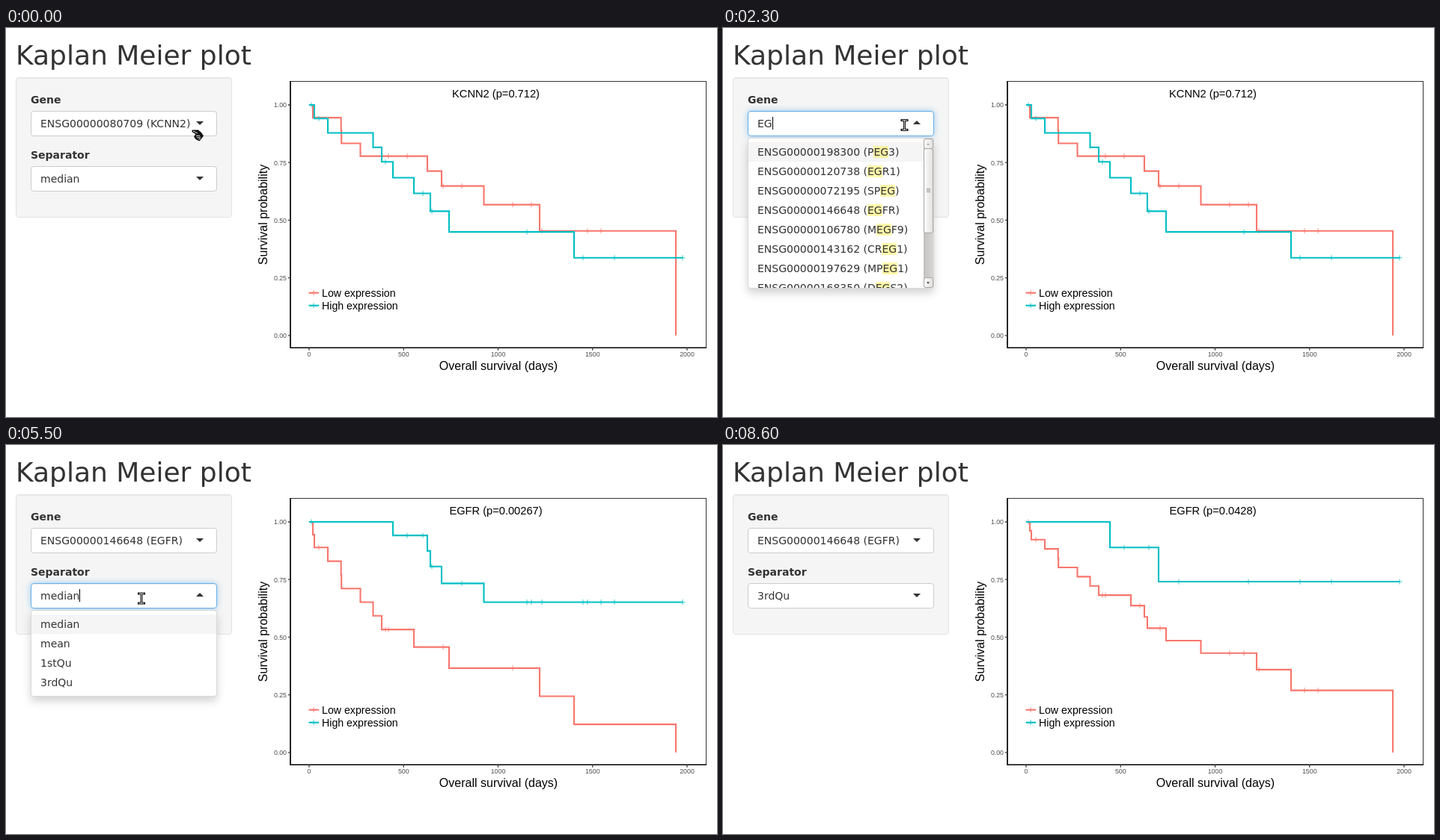
Write an HTML page that moves like this. It is 950 px wide and 521 px high and loops after 8700 ms.

```html
<!DOCTYPE html>
<html lang="en">
<head>
<meta charset="utf-8">
<title>Survival plot</title>
<style>
  html, body { margin: 0; width: 100%; height: 100%; overflow: hidden; background: #fff; }
  body { position: relative; font: 14px/20px "DejaVu Sans", sans-serif; color: #333; }
  body > *, .box::after, .bar, .bar * { position: absolute; box-sizing: border-box; }
  h2 { left: 13px; top: 17px; margin: 0; font-weight: 400; font-size: 36px; line-height: 40px; white-space: nowrap; }
  .well { left: 13px; top: 66px; width: 289px; height: 188px; background: #f5f5f5;
    border: 1px solid #e3e3e3; border-radius: 4px; box-shadow: inset 0 1px 1px rgba(0,0,0,.05); }
  b { left: 33px; }
  .box { left: 33px; width: 249px; height: 34px; padding: 6px 12px; display: flex; align-items: center;
    white-space: pre; background: #fff; border: 1px solid #ccc; border-radius: 4px; }
  .box::after { content: ""; right: 17px; top: 13px; border: 5px solid transparent;
    border-top-color: #333; border-bottom-width: 0; }
  .box.focus { border-color: #66afe9;
    box-shadow: inset 0 1px 1px rgba(0,0,0,.075), 0 0 8px rgba(102,175,233,.6); }
  .box.open::after { top: 12px; border-width: 0 5px 5px; border-bottom-color: #333; }
  .box i { width: 1px; height: 17px; margin-top: -1px; background: #000; }
  .menu { left: 33px; width: 249px; background: #fff; border: 1px solid rgba(0,0,0,.15);
    border-radius: 4px; box-shadow: 0 6px 12px rgba(0,0,0,.175); }
  .list { max-height: 200px; padding: 5px 0; box-sizing: border-box; overflow: hidden; }
  .list.long { margin-right: 13px; }
  .list div { padding: 3px 12px; }
  .list .on { background: #f5f5f5; }
  mark { background: rgba(255,237,40,.4); color: inherit; border-radius: 1px; }
  .bar { right: 0; top: 0; width: 13px; height: 200px; border-radius: 4px;
    background: linear-gradient(90deg, #c4c2c0, #d8d6d4); }
  .bar * { left: 0; width: 13px; border: 1px solid #a9a6a3; border-radius: 3px;
    background: linear-gradient(90deg, #fbfbfb, #e4e2e0); }
  .bar u { height: 14px; }
  .bar u::after { content: ""; position: absolute; left: 3px; top: 5px; border: 2.5px solid transparent; }
  .bar .up::after { border-top-width: 0; border-bottom: 3px solid #b5b5b5; }
  .bar .down { bottom: 0; }
  .bar .down::after { border-bottom-width: 0; border-top: 3px solid #555; }
  .bar s { top: 13px; }
  .bar s::after { content: ""; position: absolute; left: 3px; top: 50%; margin-top: -3px; width: 5px; height: 5px;
    background: repeating-linear-gradient(#999 0 1px, transparent 1px 2px); }
  svg { left: 0; top: 0; width: 950px; height: 521px; }
  svg text { font-family: "Liberation Sans", Arial, sans-serif; fill: #000; }
  .tick text { font-size: 8.8px; fill: #4d4d4d; }
</style>
</head>
<body>
<h2>Kaplan Meier plot</h2>
<div class="well"></div>
<b style="top:86px">Gene</b>
<b style="top:160px">Separator</b>
<div class="box" id="gene" style="top:111px"></div>
<div class="box" id="sep" style="top:185px"></div>

<svg viewBox="0 0 950 521">
  <rect x="380" y="71.5" width="555.5" height="357" fill="none" stroke="#333"/>
  <path d="M380 71V428.3H936" fill="none" stroke="#000" stroke-width="1.5"/>
  <g class="tick" id="ticks"></g>
  <text id="head" x="654.5" y="93" font-size="14.67" text-anchor="middle"></text>
  <text x="658" y="458" font-size="16" text-anchor="middle">Overall survival (days)</text>
  <text transform="translate(349 250) rotate(-90)" font-size="16" text-anchor="middle">Survival probability</text>
  <text x="422" y="360" font-size="14.2">Low expression</text>
  <text x="422" y="377" font-size="14.2">High expression</text>
  <g id="curves" fill="none"></g>
</svg>

<div class="menu" id="geneMenu" style="top:147px"></div>
<div class="menu" id="sepMenu" style="top:221px"></div>

<svg viewBox="0 0 950 521">
  <path id="arrow" d="M.5 .5V16.5L4.3 13 7 19.3 9.8 18.1 7.1 12H12Z" fill="#fff" stroke="#111" stroke-width="1.2"/>
  <g id="hand">
    <path d="M1 1H9L13 4.5 15.5 8.5 10.5 15 6 13 3.5 9.5 6 6 1 3Z" fill="#111" stroke="#111"/>
    <path d="M2 2 8 5M6 8.5 11 8M7 11 12 10M9 13 12 12" stroke="#fff" stroke-width=".9" fill="none"/>
  </g>
  <g id="beam" fill="none" stroke-linecap="square">
    <path d="M-3.500-6.500H3.500M-3.500 6.500H3.500M0-6V6" stroke="#111" stroke-width="3"/>
    <path d="M-3-6.500H3M-3 6.500H3M0-6V6" stroke="#fff" stroke-width=".8"/>
  </g>
</svg>

<script>
const LOOP = 8700, STEP = 100;
const $ = id => document.getElementById(id);
const RED = '#F8766D', TEAL = '#00BFC4';
const X0 = 405, Y1 = 103, SPAN = 308.8;

// Patients by expression: KCNN2 is 0 or 1 (above median), EGFR 0, 1 (above median) or 2 (above 3rd quartile)
const cohort = (kcnn2, egfr, deaths, censored) => [
  ...deaths.map(x => ({ x, kcnn2, egfr, dead: true })),
  ...censored.map(x => ({ x, kcnn2, egfr, dead: false }))
];
const patients = [
  cohort(0, 0, [410, 447.7, 448.2, 473.5, 713, 895], [511, 584, 677]),
  cohort(0, 1, [563, 638.5], [716, 777, 795]),
  cohort(0, 2, [582], [536, 609, 702]),
  cohort(1, 0, [412, 430, 490.5, 502, 545, 592, 759], [418, 507]),
  cohort(1, 1, [567], [408, 557, 696]),
  cohort(1, 2, [517], [569, 771, 813, 904])
].flat().sort((a, b) => a.x - b.x);

const cross = (x, y) => `M${x} ${y - 3.5}v7M${x - 3.5} ${y}h7`;
const stroke = (d, color, width, alpha = 1) =>
  `<path d="${d}" stroke="${color}" stroke-width="${width}" opacity="${alpha}"/>`;
const steps = (line, marks, color) => stroke(line, color, 2.1) + stroke(marks, color, 1, .8);
const legend = (y, color) => steps(`M404.5 ${y}h13.5`, cross(411, y), color);

// Kaplan-Meier estimate drawn as steps with censor marks
function curve(group, color) {
  let risk = group.length, s = 1, y = Y1, line = `M${X0} ${y}`, marks = '';
  for (const p of group) {
    line += `H${p.x}`;
    if (p.dead) {
      s *= (risk - 1) / risk;
      y = Y1 + (1 - s) * SPAN;
      line += `V${y}`;
    } else marks += cross(p.x, y);
    risk--;
  }
  return steps(line, marks, color);
}

function drawPlot(head, isHigh) {
  $('head').textContent = head;
  $('curves').innerHTML = curve(patients.filter(p => !isHigh(p)), RED) +
    curve(patients.filter(isHigh), TEAL) + legend(354.7, RED) + legend(371.7, TEAL);
}

for (let i = 0; i < 5; i++) {
  const x = X0 + i * 126.25, y = Y1 + SPAN * (1 - i / 4);
  $('ticks').innerHTML += `<path d="M${x} 428v3.7M377 ${y}h3" stroke="#333" stroke-width="1.3"/>
    <text x="${x}" y="440" text-anchor="middle">${i * 500}</text>
    <text x="375" y="${y + 3.3}" text-anchor="end">${(i / 4).toFixed(2)}</text>`;
}

const KCNN2 = 'ENSG00000080709 (KCNN2)', EGFR = 'ENSG00000146648 (EGFR)', MEGF9 = 'ENSG00000106780 (MEGF9)';
const first = [KCNN2, 'ENSG00000105607 (GCDH)', 'ENSG00000059769 (DNAJC25)', 'ENSG00000155666 (KDM8)',
  'ENSG00000143257 (NR1I3)', 'ENSG00000091831 (ESR1)', 'ENSG00000115841 (RMDN2)'];
const matches = ['ENSG00000198300 (PEG3)', 'ENSG00000120738 (EGR1)', 'ENSG00000072195 (SPEG)', EGFR, MEGF9,
  'ENSG00000143162 (CREG1)', 'ENSG00000197629 (MPEG1)', 'ENSG00000168350 (DEGS2)'];
const splits = ['median', 'mean', '1stQu', '3rdQu'];
const search = q => q.length < 2 ? first : matches.filter(name => name.includes(q));

// Times of key presses and of the list catching up
const presses = [1900, 2200, 2600, 2800], refreshes = [2100, 2300, 2600, 2900];
const typed = (times, t) => 'EGFR'.slice(0, times.filter(k => k <= t).length);
const blink = (since, t) => t >= since && Math.floor((t - since) / 500) % 2 === 0;

// Pointer moves: from time, to time, x, y
const moves = [[0, 200, 242.5, 130], [3400, 3600, 238, 155], [3800, 4000, 230, 163],
  [4800, 5300, 196, 192], [5400, 6300, 61, 313.5], [7100, 7200, 19, 326]];

function pointerAt(t) {
  let x = 248, y = 136;
  for (const [from, to, tx, ty] of moves) {
    const f = Math.min(1, Math.max(0, (t - from) / (to - from)));
    x += (tx - x) * f;
    y += (ty - y) * f;
  }
  return [x, y];
}

function pointerKind(y, geneOpen, sepOpen) {
  const onGene = y > 111 && y < 145, onSep = y > 185 && y < 219;
  if (geneOpen && onGene || sepOpen && onSep) return 'beam';
  return geneOpen || sepOpen || onGene || onSep ? 'hand' : 'arrow';
}

function setBox(id, text, caret, focus, open) {
  $(id).className = 'box' + (focus ? ' focus' : '') + (open ? ' open' : '');
  $(id).innerHTML = `<span>${text}</span>${caret ? '<i></i>' : ''}`;
}

function setMenu(id, open, rows, active, q = '', thumb = 0) {
  $(id).style.display = open ? 'block' : 'none';
  if (!open) return;
  const paint = s => q ? s.split(q).join(`<mark>${q}</mark>`) : s;
  const items = rows.map((r, i) => `<div class="${i === active ? 'on' : ''}">${paint(r)}</div>`).join('');
  const bar = `<div class="bar"><u class="up"></u><s style="height:${thumb}px"></s><u class="down"></u></div>`;
  $(id).innerHTML = `<div class="list ${thumb ? 'long' : ''}">${items}</div>${thumb ? bar : ''}`;
}

function render(t) {
  const [x, y] = pointerAt(t);
  const geneOpen = t >= 400 && t < 3800, sepOpen = t >= 5200 && t < 6600;

  const q = typed(refreshes, t), rows = search(q);
  const text = t < 1000 ? KCNN2 : t < 3800 ? typed(presses, t) : EGFR;
  const lastEdit = [500, 1100, presses[0], ...refreshes].filter(k => k <= t).pop();
  setBox('gene', text, geneOpen && blink(lastEdit, t), t >= 400 && t < 5200, geneOpen);
  setMenu('geneMenu', geneOpen, rows, 0, q, rows.length < 3 ? 0 : rows === first ? 34 : 114);

  const hover = Math.max(0, Math.min(3, Math.floor((y - 227) / 26)));
  setBox('sep', t < 6600 ? splits[0] : splits[3], sepOpen && blink(5200, t), t >= 5200 && t < 8600, sepOpen);
  setMenu('sepMenu', sepOpen, splits, hover);

  if (t < 4400) drawPlot('KCNN2 (p=0.712)', p => p.kcnn2 > 0);
  else if (t < 6900) drawPlot('EGFR (p=0.00267)', p => p.egfr > 0);
  else drawPlot('EGFR (p=0.0428)', p => p.egfr > 1);

  const kind = t < 7300 ? pointerKind(y, geneOpen, sepOpen) : '';
  for (const id of ['arrow', 'hand', 'beam']) {
    $(id).style.display = id === kind ? '' : 'none';
    $(id).setAttribute('transform', `translate(${x} ${y})`);
  }
}

const start = performance.now();
let last = -1;
function tick() {
  const t = Math.floor((performance.now() - start) % LOOP / STEP) * STEP;
  if (t !== last) render(last = t);
  requestAnimationFrame(tick);
}
tick();
</script>
</body>
</html>
```
